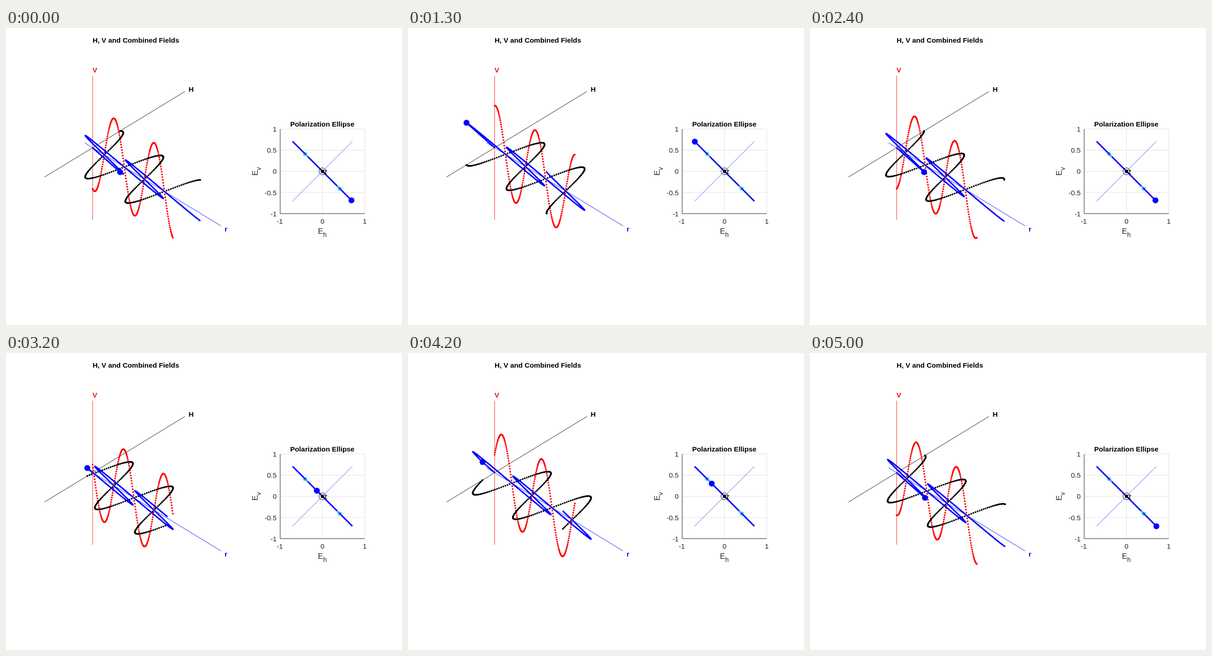
Animation, 864 px wide and 648 px high, one loop 5100 ms. Source, as an HTML page with a canvas:

```html
<!DOCTYPE html>
<html>
<head>
<meta charset="utf-8">
<title>Polarization</title>
<style>
html, body { margin: 0; width: 100%; height: 100%; overflow: hidden; background: #fff; }
canvas { display: block; }
</style>
</head>
<body>
<canvas id="stage" width="864" height="648"></canvas>
<script>
const ctx = document.getElementById('stage').getContext('2d');
const BLUE = '#00f', RED = '#f00', BLACK = '#000', INK = '#262626', CYAN = '#4dbeee';
const AMPLITUDE = Math.SQRT1_2;
const STEP = 100, LOOP = 5100, STEPS_PER_CYCLE = 25;
const SAMPLES = 200, WAVELENGTHS = 2;

// Oblique view of (distance r in wavelengths, horizontal, vertical).
const project = (r, h, v) => [189 + 87.5 * (r + h), 261.2 + 53.3 * (r - h) - 130.8 * v];
// Position in the ellipse plot.
const plot = (h, v) => [690.5 + 92.3 * h, 312.7 - 92.3 * v];

function line(points, color, width = 1) {
  ctx.beginPath();
  points.forEach(p => ctx.lineTo(...p));
  ctx.strokeStyle = color;
  ctx.lineWidth = width;
  ctx.stroke();
}

function dot([x, y], radius, color) {
  ctx.beginPath();
  ctx.arc(x, y, radius, 0, 2 * Math.PI);
  ctx.fillStyle = color;
  ctx.fill();
}

function text(string, x, y, color = BLACK, weight = 'bold', align = 'left', size = 15.3) {
  ctx.font = `${weight} ${size}px "Liberation Sans", Arial, sans-serif`;
  ctx.textAlign = align;
  ctx.fillStyle = color;
  ctx.fillText(string, x, y);
}

function axisLabel(subscript, x, y, angle) {
  ctx.save();
  ctx.translate(x, y);
  ctx.rotate(angle);
  text('E', 0, 0, INK, 'normal', 'left', 17);
  text(subscript, 11.5, 7, INK, 'normal', 'left', 14);
  ctx.restore();
}

function drawFields(phase) {
  const field = r => AMPLITUDE * Math.cos(phase - 2 * Math.PI * r);
  const samples = Array.from({ length: SAMPLES + 1 }, (_, i) => i * WAVELENGTHS / SAMPLES);

  text('H, V and Combined Fields', 189, 31.5);
  text('V', 188.7, 96.5, RED);
  text('H', 398.5, 138.5);
  text('r', 477, 443.5, BLUE);
  line([project(0, 0, -1.2), project(0, 0, 1.2)], RED, 0.9);
  line([project(0, -1.2, 0), project(0, 2.3, 0)], BLACK, 0.9);
  line([project(-0.2, 0, 0), project(3.2, 0, 0)], BLUE, 0.9);

  samples.forEach(r => dot(project(r, 0, field(r)), 1.9, RED));
  samples.forEach(r => dot(project(r, -field(r), 0), 1.9, BLACK));
  line(samples.map(r => project(r, -field(r), field(r))), BLUE, 3.2);
  const tip = project(0, -field(0), field(0));
  line([project(0, 0, 0), tip], BLUE, 3.2);
  dot(tip, 6.5, BLUE);
}

function drawEllipse(value) {
  for (const tick of [-1, -0.5, 0, 0.5, 1]) {
    const [x, y] = plot(tick, tick);
    line([plot(-1, tick), plot(1, tick)], '#dfdfdf');
    text(tick, 590.5, y + 5.7, INK, 'normal', 'right');
    if (Number.isInteger(tick)) {
      line([plot(tick, -1), plot(tick, 1)], '#dfdfdf');
      text(tick, x - (tick < 0 ? 1 : 0), 426.5, INK, 'normal', 'center');
    }
  }
  line([plot(-1, 1), plot(-1, -1), plot(1, -1)], INK);
  text('Polarization Ellipse', 690.2, 214.5, BLACK, 'bold', 'center');
  axisLabel('h', 680.5, 448.5, 0);
  axisLabel('v', 548.5, 322, -Math.PI / 2);

  const a = AMPLITUDE;
  line([plot(-a, -a), plot(a, a)], BLUE, 0.7);
  line([plot(-a, a), plot(a, -a)], BLUE, 3.2);
  for (const side of [-1, 1]) {
    const arm = (h, v) => plot(side * h, -side * v);
    line([arm(0.46, 0.4), arm(0.354, 0.354), arm(0.4, 0.46)], CYAN, 2.6);
  }

  const center = plot(0, 0);
  dot(center, 3.7, BLACK);
  ctx.beginPath();
  ctx.arc(...center, 7.5, 0, 2 * Math.PI);
  ctx.strokeStyle = BLACK;
  ctx.lineWidth = 1;
  ctx.stroke();
  text('z', 693.5, 318, BLACK, 'normal');
  dot(plot(-value, value), 6.5, BLUE);
}

function draw(now) {
  const tick = Math.floor(now % LOOP / STEP);
  const step = tick < 2 ? tick : tick - 1; // the second pose is held twice as long
  const phase = Math.PI + 2 * Math.PI * (step + 1) / STEPS_PER_CYCLE;
  ctx.fillStyle = '#fff';
  ctx.fillRect(0, 0, 864, 648);
  drawFields(phase);
  drawEllipse(AMPLITUDE * Math.cos(phase));
}

ctx.lineJoin = 'round';
const start = performance.now();
function animate() {
  draw(performance.now() - start);
  requestAnimationFrame(animate);
}
animate();
</script>
</body>
</html>
```
